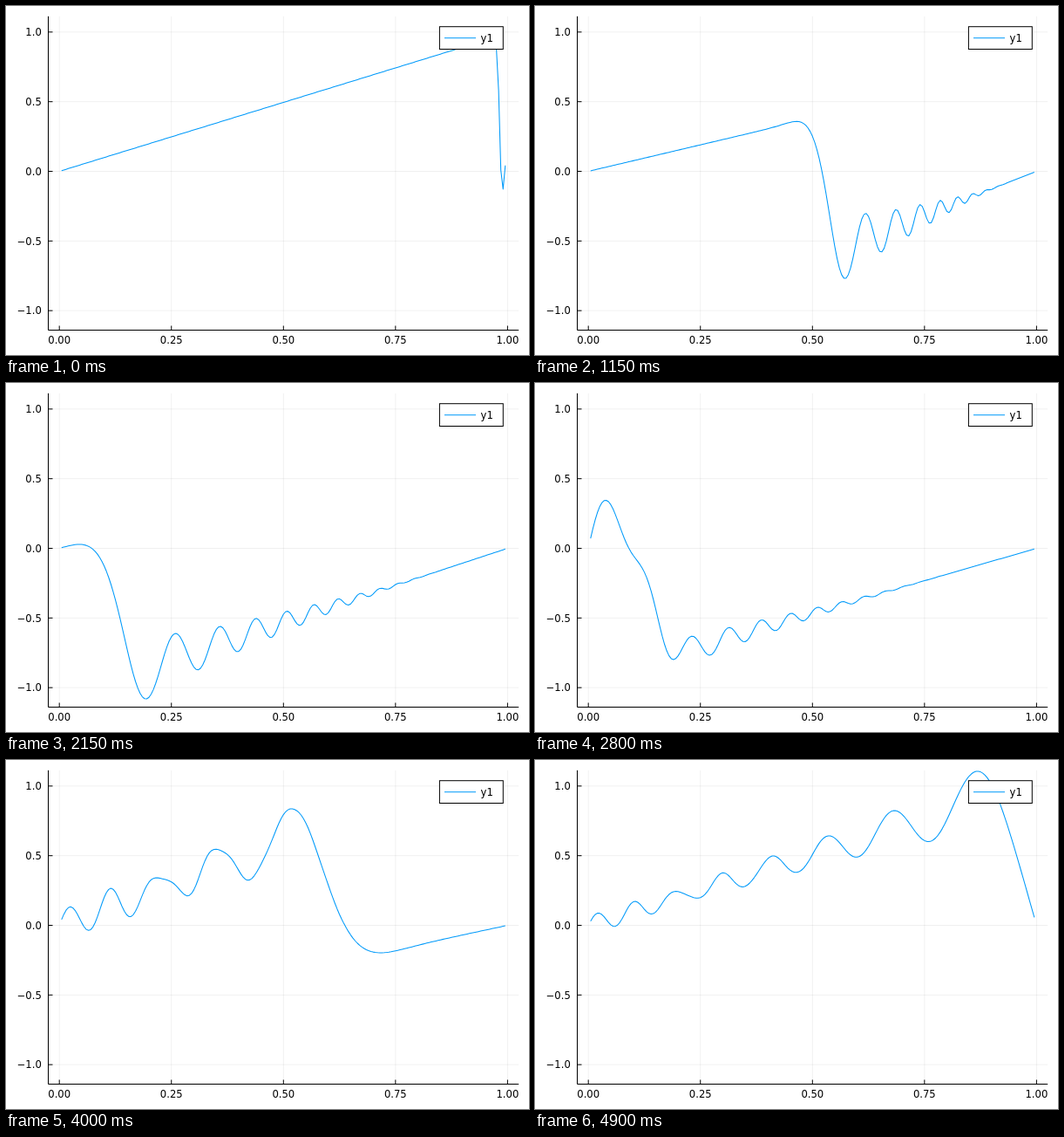
Animation of 600x400 px, one loop 4950 ms. Source, as an HTML page:

```html
<!DOCTYPE html>
<html>
<head>
<meta charset="utf-8">
<style>
  html, body { margin: 0; width: 100%; height: 100%; overflow: hidden; background: #fff; }
  svg { display: block; }
  text { font: 11.6px "DejaVu Sans", sans-serif; }
</style>
</head>
<body>
<svg width="600" height="400" viewBox="0 0 600 400">
  <path id="grid" stroke="#000" stroke-opacity=".1" stroke-width=".6"/>
  <path id="axes" fill="none" stroke="#000"/>
  <g id="labels"></g>
  <polyline id="wave" fill="none" stroke="#009afa" stroke-width="1.05" stroke-linejoin="round"/>
  <rect x="497.4" y="23.7" width="72.9" height="25.8" fill="#fff" stroke="#000"/>
  <path d="M503 36.7H539" stroke="#009afa"/>
  <text x="544.6" y="41">y1</text>
</svg>
<script>
const $ = id => document.getElementById(id);
const left = 48.5, right = 588.2, top_ = 11.8, bottom = 371.5;
const px = x => 61.2 + 514.2 * x;
const py = y => 189.5 - 159.65 * y;

function drawAxes() {
  let grid = '', axes = `M${left} ${top_}V${bottom}H${right}`, labels = '';
  const label = (x, y, anchor, text) =>
    labels += `<text x="${x}" y="${y}" text-anchor="${anchor}">${text}</text>`;
  for (let i = 0; i <= 4; i++) {
    const x = px(i / 4), value = i / 2 - 1, y = py(value);
    grid += `M${x} ${top_}V${bottom}M${left} ${y}H${right}`;
    axes += `M${x} ${bottom}v-5M${left} ${y}h5`;
    label(x, 387.4, 'middle', (i / 4).toFixed(2));
    label(40.8, y + 4.2, 'end', value.toFixed(1).replace('-', '\u2212'));
  }
  $('grid').setAttribute('d', grid);
  $('axes').setAttribute('d', axes);
  $('labels').innerHTML = labels;
}

// String with u = x and u' = -x/2 at t = 0, as damped, dispersive sine modes
const N = 200;

// Relative loss of group speed at scaled wave number q
function slowdown(q) {
  const q4 = 1.08e-4 * q ** 4;
  return q4 / (q * q + 1560 + q4);
}

function modeAmplitudes(t) {
  const amps = [0];
  let lag = 0;
  for (let j = 1; j < N; j++) {
    const k = Math.PI * j;
    lag += Math.PI * t * slowdown((k - Math.PI / 2) * t ** 0.4);
    const phase = k * t - lag;
    const damping = 0.84 * (k / 118) ** 3.3 * (t / 0.88) ** 1.8;
    const start = (j % 2 ? 1 : -1) / Math.tan(k / (2 * N)) / N;
    amps.push(start * Math.exp(-damping) * (Math.cos(phase) - Math.sin(phase) / (2 * k)));
  }
  return amps;
}

function drawWave(t) {
  const amps = modeAmplitudes(t), points = [];
  for (let i = 1; i < N; i++) {
    const u = amps.reduce((sum, a, j) => sum + a * Math.sin(Math.PI * i * j / N), 0);
    points.push(px(i / N).toFixed(2) + ',' + py(u).toFixed(2));
  }
  $('wave').setAttribute('points', points.join(' '));
}

let shown = -1;
function tick() {
  const step = Math.floor(performance.now() / 50) % 99;
  if (step !== shown) drawWave(0.02 * (step + 1));
  shown = step;
  requestAnimationFrame(tick);
}

drawAxes();
tick();
</script>
</body>
</html>
```
